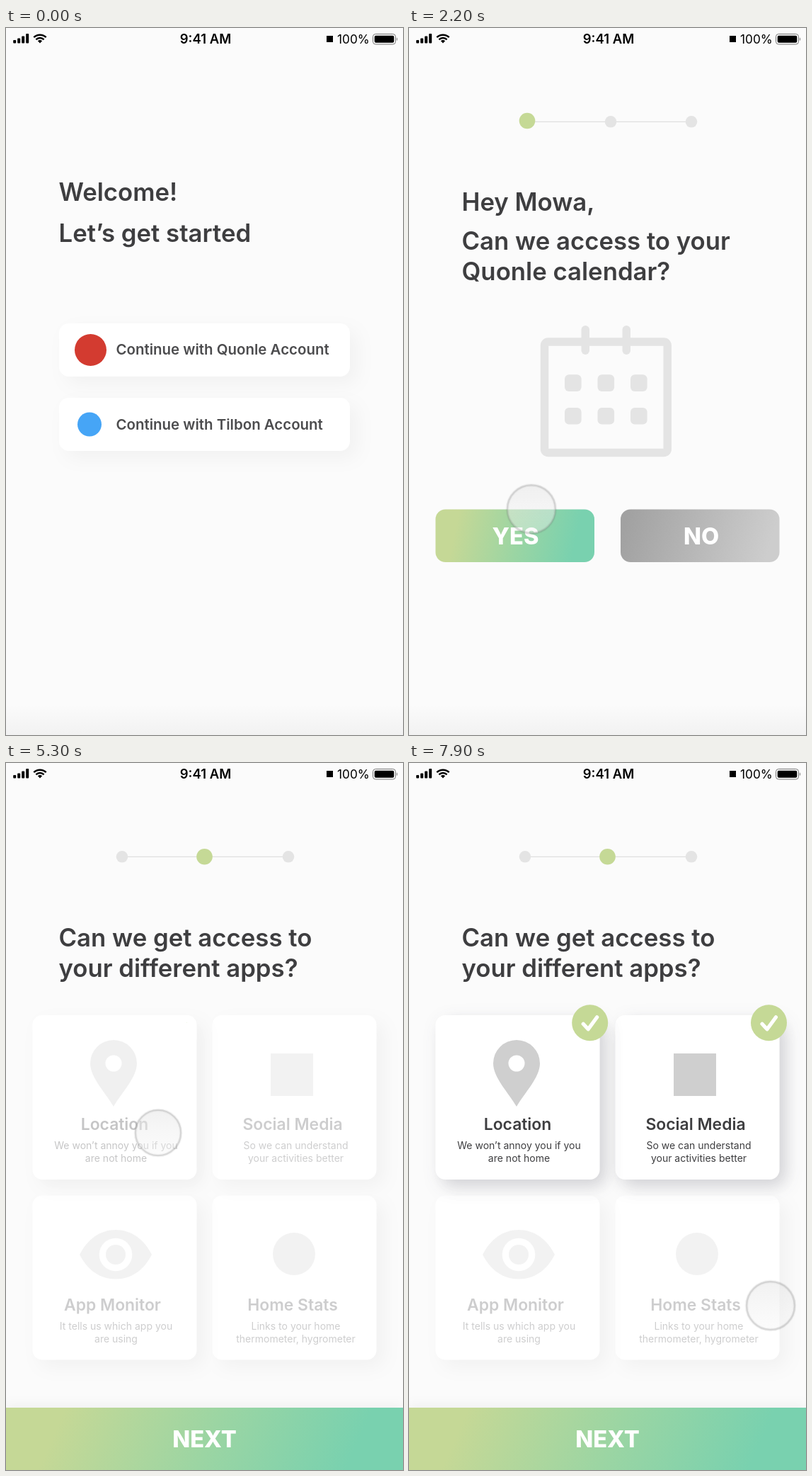
Animation, 561 px wide and 998 px high, one loop 8 s. Source, as an HTML page:

```html
<!DOCTYPE html>
<html lang="en">
<head>
<meta charset="utf-8">
<title>Onboarding</title>
<style>
  html, body { margin: 0; width: 100%; height: 100%; overflow: hidden; background: #fbfbfb; }
  svg { display: block; width: 561px; height: 998px; }
  text { font-family: Inter, "Liberation Sans", sans-serif; fill: #3e3e40; }
  .head { font-size: 34.75px; font-weight: 600; }
  .option { font-size: 20.45px; font-weight: 600; fill: #4c4c4e; }
  .label { font-size: 32.6px; font-weight: 800; fill: #fff; text-anchor: middle; }
  .title { font-size: 22.9px; font-weight: 600; text-anchor: middle; }
  .note { font-size: 14px; text-anchor: middle; }
  .status text { fill: #000; }
  .icon { fill: #cfcfcf; }
  .soft { fill: #fff; filter: drop-shadow(10px 10px 13px rgba(0, 0, 0, .04)); }
  .deep { fill: #fff; filter: drop-shadow(8px 9px 12px rgba(45, 45, 70, .17)); }
</style>
</head>
<body>
<svg viewBox="0 0 561 998">
  <defs>
    <linearGradient id="green" x1="0" y1="0" x2="1" y2=".07">
      <stop offset=".15" stop-color="#c5d896"/>
      <stop offset=".55" stop-color="#9bd5a3"/>
      <stop offset=".92" stop-color="#79d1af"/>
    </linearGradient>
    <linearGradient id="gray" x1="0" y1="0" x2="1" y2=".1">
      <stop offset=".05" stop-color="#a1a1a1"/>
      <stop offset="1" stop-color="#cdcdcd"/>
    </linearGradient>
    <linearGradient id="floor" x1="0" y1="0" x2="0" y2="1">
      <stop offset="0" stop-color="#000" stop-opacity="0"/>
      <stop offset="1" stop-color="#000" stop-opacity=".038"/>
    </linearGradient>
    <linearGradient id="glass" x1="0" y1="0" x2="0" y2="1">
      <stop offset="0" stop-color="#e6e6e6" stop-opacity=".55"/>
      <stop offset="1" stop-color="#f6f6f6" stop-opacity=".38"/>
    </linearGradient>
  </defs>
  <rect width="561" height="998" fill="#fbfbfb"/>
  <rect y="955" width="561" height="43" fill="url(#floor)"/>

  <g class="status">
    <g id="bars"></g>
    <g fill="none" stroke="#000" stroke-width="2.5">
      <path d="M39.3 13.2A12.4 12.4 0 0 1 56.7 13.2"/>
      <path d="M42.4 16.4A8 8 0 0 1 53.6 16.4"/>
    </g>
    <path d="M48 21.4L44.9 18.3A4.4 4.4 0 0 1 51.1 18.3Z"/>
    <text x="282" y="22" text-anchor="middle" font-size="18.5" font-weight="600">9:41 AM</text>
    <rect x="453" y="11" width="9" height="9"/>
    <text x="468" y="22" font-size="17.3">100%</text>
    <rect x="518.5" y="8.5" width="32" height="14.5" rx="3.8" fill="none" stroke="#777"/>
    <rect x="520.7" y="10.7" width="27.6" height="10.1" rx="2"/>
    <path d="M552 13.3Q554.2 15.7 552 18.2Z" fill="#777"/>
  </g>

  <g id="welcome">
    <text class="head" x="74.5" y="243.5">Welcome!</text>
    <text class="head" x="74.5" y="302">Let’s get started</text>
    <rect class="soft" x="75" y="417" width="411" height="75" rx="14"/>
    <rect class="soft" x="75" y="522" width="411" height="75" rx="14"/>
    <circle cx="119.5" cy="454.5" r="22.5" fill="#d33b30"/>
    <circle cx="118" cy="559.5" r="17" fill="#46a5f6"/>
    <text class="option" x="155.5" y="461">Continue with Quonle Account</text>
    <text class="option" x="155.5" y="567">Continue with Tilbon Account</text>
  </g>

  <g id="calendar">
    <g class="steps" data-on="0"></g>
    <text class="head" x="74.5" y="257.5">Hey Mowa,</text>
    <text class="head" x="74.5" y="312.5">Can we access to your</text>
    <text class="head" x="74.5" y="355.5">Quonle calendar?</text>
    <rect x="191.5" y="443" width="173.7" height="156.5" rx="5" fill="none" stroke="#e4e4e4" stroke-width="11.5"/>
    <g id="cells" fill="#e4e4e4"></g>
    <rect x="37.5" y="679.5" width="224.5" height="74.5" rx="14" fill="url(#green)"/>
    <rect x="299" y="679.5" width="224.5" height="74.5" rx="14" fill="url(#gray)"/>
    <text class="label" x="150.5" y="728.7">YES</text>
    <text class="label" x="413" y="728.7">NO</text>
  </g>

  <g id="apps">
    <g class="steps" data-on="1"></g>
    <text class="head" x="74.5" y="258.5">Can we get access to</text>
    <text class="head" x="74.5" y="302">your different apps?</text>
    <g id="cards"></g>
    <rect y="910" width="561" height="88" fill="url(#green)" style="filter:drop-shadow(0 -4px 8px rgba(0,0,0,.045))"/>
    <text class="label" x="280.5" y="965.5">NEXT</text>
  </g>

  <g id="cursor">
    <circle r="34" fill="url(#glass)"/>
    <g fill="none" stroke="#787878">
      <circle r="34" stroke-opacity=".06" stroke-width="5"/>
      <circle r="34" stroke-opacity=".24" stroke-width="2.5"/>
    </g>
  </g>
</svg>
<script>
const LOOP = 8000;
const $ = id => document.getElementById(id);
const box = (x, y, w, h, r) => `<rect x="${x}" y="${y}" width="${w}" height="${h}" rx="${r}"/>`;

$('bars').innerHTML = [4.5, 7, 10, 13.5]
  .map((h, i) => box(10.2 + i * 6, 21.5 - h, 4, h, 1)).join('');

$('cells').innerHTML =
  [243.5, 301.5].map(x => box(x, 420, 11.5, 41, 5.75)).join('') +
  [489.3, 536].map(y => [220, 266.5, 313].map(x => box(x, y, 23.6, 23.6, 6)).join('')).join('');

document.querySelectorAll('.steps').forEach(g => {
  const on = +g.dataset.on;
  const xs = on ? [164, 280.5, 399] : [167, 285, 399];
  g.innerHTML = '<path d="M164 132.3H399" stroke="#dfdfdf" stroke-width="1.2"/>' + xs.map((x, i) =>
    `<circle cx="${x}" cy="${on || i ? 132.3 : 131}" r="${i === on ? 11.3 : 8.3}" fill="${i === on ? '#c5d996' : '#e4e4e4'}"/>`).join('');
});

const cards = [
  { x: 37.5, y: 356, mid: 153.5, title: 'Location', notes: ['We won’t annoy you if you', 'are not home'], at: 5000,
    icon: '<path fill-rule="evenodd" d="M152 485C141 466 119 444 119 424A33 33 0 0 1 185 424C185 444 163 466 152 485ZM140.5 424a11.5 11.5 0 1 0 23 0a11.5 11.5 0 1 0 -23 0Z"/>' },
  { x: 291.5, y: 356, mid: 405, title: 'Social Media', notes: ['So we can understand', 'your activities better'], at: 6600,
    icon: box(374, 410, 60, 60, 0) },
  { x: 37.5, y: 610.5, mid: 150.5, title: 'App Monitor', notes: ['It tells us which app you', 'are using'],
    icon: '<path d="M104 694C115 672 133 659 155 659S195 672 206 694C195 716 177 728.5 155 728.5S115 716 104 694Z"/>' +
      '<circle cx="155" cy="694" r="23.3" fill="#fff"/><circle cx="155" cy="694" r="14"/>' },
  { x: 291.5, y: 610.5, mid: 405, title: 'Home Stats', notes: ['Links to your home', 'thermometer, hygrometer'],
    icon: '<circle cx="407" cy="693" r="30"/>' }
];

// Later cards go first so that shadows fall on their neighbours.
$('cards').innerHTML = cards.map((c, i) => {
  const rect = k => `<rect class="${k}" x="${c.x}" y="${c.y}" width="232" height="232" rx="14"/>`;
  return `<g>${rect('soft')}<g id="deep${i}">${rect('deep')}</g><g id="body${i}">
    <g class="icon">${c.icon}</g>
    <text class="title" x="${c.mid}" y="${c.y + 162}">${c.title}</text>
    ${c.notes.map((n, j) => `<text class="note" x="${c.x + 118}" y="${c.y + 189 + j * 18}">${n}</text>`).join('')}
  </g></g>`;
}).reverse().join('') + cards.map((c, i) => c.at ? `<g id="badge${i}">
  <circle r="25.5" fill="#c5d996"/>
  <path d="M-9.5 1.5L-2.5 9L10 -8" fill="none" stroke="#fff" stroke-width="5.2" stroke-linecap="round" stroke-linejoin="round"/>
</g>` : '').join('');

const clamp = v => Math.max(0, Math.min(1, v));
const ramp = (t, a, b) => clamp((t - a) / (b - a));
const smooth = p => p * p * (3 - 2 * p);
const out = p => 1 - (1 - p) ** 3;
const back = p => 1 + 2.7 * (p - 1) ** 3 + 1.7 * (p - 1) ** 2;

// Cursor path: time, x, y
const path = [
  [30, 602, 533], [450, 450, 466], [900, 434, 454],
  [1920, 434, 454], [2200, 173, 679], [2800, 152, 719],
  [3820, 152, 719], [4200, 195, 525], [4600, 215, 522],
  [5890, 215, 522], [6000, 487, 517], [6300, 508, 519],
  [7420, 508, 519], [7850, 511, 766]
];
const presses = [1000, 2900, 5000, 6600];

function place(t) {
  const n = path.findIndex(k => k[0] > t);
  if (n === 0) return path[0].slice(1);
  if (n < 0) return path[path.length - 1].slice(1);
  const [a, b] = [path[n - 1], path[n]];
  const p = out(ramp(t, a[0], b[0]));
  return [a[1] + (b[1] - a[1]) * p, a[2] + (b[2] - a[2]) * p];
}

function draw(t) {
  const first = smooth(ramp(t, 1300, 1500));
  const second = smooth(ramp(t, 3200, 3400));
  $('welcome').style.opacity = 1 - first;
  $('calendar').style.opacity = first * (1 - second);
  $('apps').style.opacity = second;

  cards.forEach((c, i) => {
    const on = c.at ? smooth(ramp(t, c.at + 250, c.at + 600)) : 0;
    $('deep' + i).style.opacity = on;
    $('body' + i).style.opacity = .25 + .75 * on;
    if (!c.at) return;
    const pop = ramp(t, c.at + 300, c.at + 700);
    const size = pop ? Math.max(0, back(pop)) : 0;
    $('badge' + i).setAttribute('transform', `translate(${i ? 508.5 : 255.7} 366.8) scale(${size})`);
  });

  const [x, y] = place(t);
  const dip = presses.reduce((s, a) => s + smooth(ramp(t, a, a + 200)) - smooth(ramp(t, a + 200, a + 400)), 0);
  $('cursor').setAttribute('transform', `translate(${x} ${y}) scale(${1 - .11 * dip})`);
}

const start = performance.now();
function tick() {
  draw((performance.now() - start) % LOOP);
  requestAnimationFrame(tick);
}
tick();
</script>
</body>
</html>
```
